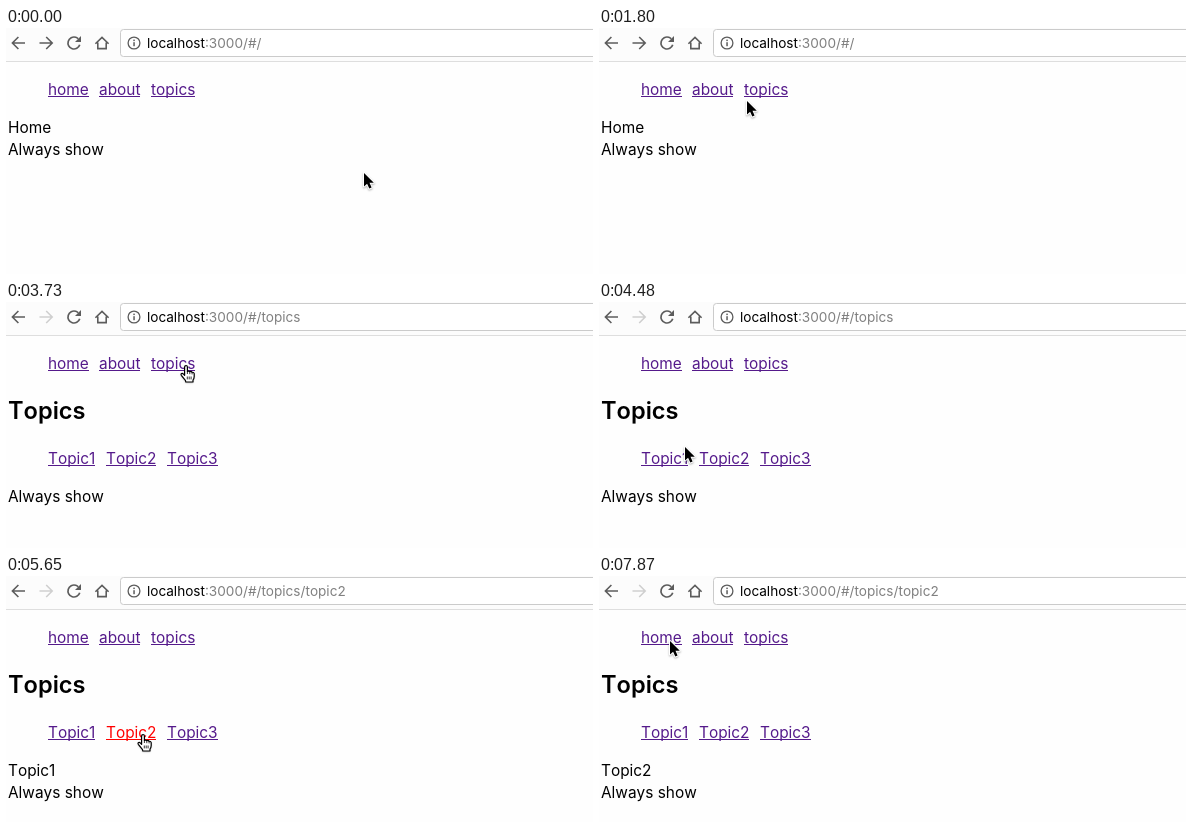
These frames come from a looping animation (587 by 246 pixels, 8 s). An HTML page with a canvas:

```html
<!DOCTYPE html>
<html lang="en">
<head>
<meta charset="utf-8">
<title>Router demo</title>
<style>
  html, body { margin: 0; width: 100%; height: 100%; overflow: hidden; background: #fefefe; }
  canvas { display: block; }
</style>
</head>
<body>
<canvas id="stage" width="587" height="246"></canvas>
<script>
const ctx = document.getElementById('stage').getContext('2d');
const LOOP = 8000, STEP = 147.5;
const PAGE = '#fefefe', ICON = '#5c5c5c', VISITED = '#551a8b';
const FAMILY = 'Inter, "Noto Sans", sans-serif';
const BODY = '15.4px ' + FAMILY;
const TITLE = '600 23.6px ' + FAMILY;
const URL_FONT = '13.6px ' + FAMILY;

// The page may follow its address after a lag
const clicks = [
  { at: 0, path: '' },
  { at: 2540, path: 'about' },
  { at: 3730, path: 'topics' },
  { at: 5070, path: 'topics/topic1' },
  { at: 5650, path: 'topics/topic2', lag: 150 },
  { at: 6530, path: 'topics/topic3' },
  { at: 7570, path: 'topics/topic2' }
];

// Each glide eases to its end point in a few held steps
const home = { x: 358, y: 145 };
const glides = [
  { at: 1500, steps: 6, x: 118, y: 63 },
  { at: 3140, steps: 2, x: 180, y: 63 },
  { at: 4180, steps: 5, x: 80, y: 151 },
  { at: 5360, steps: 2, x: 137, y: 158 },
  { at: 5950, steps: 3, x: 176, y: 158 },
  { at: 6980, steps: 1, x: 168, y: 158 },
  { at: 7130, steps: 2, x: 124, y: 158 },
  { at: 7870, steps: 1, x: 71, y: 65 }
];

const nav = [['home', 42, 67], ['about', 93, 67], ['topics', 145, 67]];
const topics = [['Topic1', 42, 162], ['Topic2', 100, 162], ['Topic3', 161, 162]];

const arrowShape = new Path2D('M0 0V13.6L3.1 10.7L5.3 15.6L7.6 14.6L5.5 9.8H9.8Z');
const handShape = new Path2D(
  'M-1.4 9V2Q-1.4 .6 0 .6Q1.4 .6 1.4 2V6.4Q2.7 5.5 3.8 6.7Q5.2 6 6.1 7.3' +
  'Q7.8 7 8.2 8.6V11.5Q8.2 13.4 7 15V17H-.2Q-.2 15.6-1.6 14.2L-4.7 10.3' +
  'Q-5.4 9-4.4 8.5Q-3.4 8.1-2.5 9.2L-1.4 10.4Z');
const handLines = new Path2D('M1.4 6.4V9M3.8 6.8V9.2M6.1 7.4V9.4M1.3 11.5V14.4M3.2 11.5V14.4M5.1 11.5V14.4');
const backShape = new Path2D('M19 15H6.6M12.4 9L6.4 15L12.4 21');
const forwardShape = new Path2D('M33.5 15H46M40.2 9L46.2 15L40.2 21');
const houseShape = new Path2D('M89.4 15.8L96 9.4L102.6 15.8M91.8 14.4V20.6H100.2V14.4');
const stopShape = new Path2D('M63 10L73 20M73 10L63 20');
const reloadHead = new Path2D('M75 8V14H69Z');

const easeOut = p => 1 - (1 - p) ** 3;

function arc(x, y, r, from, to) {
  const path = new Path2D();
  path.arc(x, y, r, from, to);
  return path;
}

function fill(path, color) {
  ctx.fillStyle = color;
  ctx.fill(path);
}

function stroke(path, color, width) {
  ctx.strokeStyle = color;
  ctx.lineWidth = width;
  ctx.stroke(path);
}

function rect(x, y, w, h, color) {
  ctx.fillStyle = color;
  ctx.fillRect(x, y, w, h);
}

// Returns the right edge of the text
function text(str, x, y, font = BODY, color = '#000') {
  ctx.font = font;
  ctx.fillStyle = color;
  ctx.fillText(str, x, y);
  return x + ctx.measureText(str).width;
}

function link([label, x, y], color) {
  const end = text(label, x, y, BODY, color);
  rect(x, y + 1, Math.round(end) - x, 1, color);
}

function toolbar(t, path) {
  rect(0, 0, 587, 33, '#fcfcfc');
  rect(0, 33, 587, 1, '#dedede');
  const field = new Path2D();
  field.roundRect(114.5, 1.5, 490, 27, 3);
  fill(field, '#fff');
  stroke(field, '#cbcbcb', 1);

  stroke(backShape, ICON, 1.6);
  stroke(forwardShape, t < 2540 ? ICON : '#cfcfcf', 1.6);
  if (t >= 600 && t < 1050) {
    stroke(stopShape, ICON, 1.7);
  } else {
    stroke(arc(68, 15, 6, 0.3, 5.5), ICON, 1.7);
    fill(reloadHead, ICON);
  }
  stroke(houseShape, ICON, 1.6);

  stroke(arc(128, 15, 5.9, 0, Math.PI * 2), ICON, 1.3);
  rect(127.3, 11.6, 1.5, 1.5, ICON);
  rect(127.3, 14.2, 1.5, 4, ICON);

  const end = text('localhost', 141, 20, URL_FONT);
  text(':3000/#/' + path, end, 20, URL_FONT, '#808080');
}

function page(path, pressed) {
  nav.forEach(item => link(item, VISITED));

  let y = 105;
  if (path.startsWith('topics')) {
    text('Topics', 2, 117, TITLE);
    topics.forEach(item => link(item, item[0] === pressed ? '#f00' : VISITED));
    y = 200;
  }
  if (path !== 'topics') {
    text(viewName(path), 2, y);
    y += 22;
  }
  text('Always show', 2, y);
}

function viewName(path) {
  const name = path.split('/').pop() || 'home';
  return name[0].toUpperCase() + name.slice(1);
}

function pointerAt(t) {
  let pos = home;
  for (const { at, steps, x, y } of glides) {
    if (t < at) break;
    const p = easeOut(Math.min(1, (Math.floor((t - at) / STEP) + 1) / steps));
    pos = { x: pos.x + (x - pos.x) * p, y: pos.y + (y - pos.y) * p };
  }
  return pos;
}

function linkAt({ x, y }) {
  ctx.font = BODY;
  return [...nav, ...topics].find(([label, left, base]) =>
    x >= left && x <= left + ctx.measureText(label).width && y >= base - 15 && y <= base + 5);
}

// The hand appears one step after the pointer reaches a link
function pointer(t) {
  const pos = pointerAt(t);
  const over = linkAt(pos);
  const hand = over && over === linkAt(pointerAt(t - STEP));
  ctx.save();
  ctx.translate(Math.round(pos.x), Math.round(pos.y));
  ctx.lineJoin = 'round';
  ctx.shadowColor = 'rgba(0,0,0,.3)';
  ctx.shadowBlur = 2;
  ctx.shadowOffsetY = 1;
  if (hand) fill(handShape, '#fff');
  else stroke(arrowShape, '#fff', 2);
  ctx.shadowColor = 'transparent';
  if (hand) {
    stroke(handShape, '#000', 1.2);
    stroke(handLines, '#000', 0.8);
  } else {
    fill(arrowShape, '#000');
  }
  ctx.restore();
}

function draw(t) {
  const i = clicks.findLastIndex(c => c.at <= t);
  const { at, path, lag = 0 } = clicks[i];
  const waiting = t < at + lag;
  const shown = waiting ? clicks[i - 1].path : path;
  const reloading = t >= 900 && t < 1050;

  ctx.fontKerning = 'none';
  rect(0, 0, 587, 246, PAGE);
  toolbar(t, path);
  if (!reloading) page(shown, waiting && viewName(path));
  pointer(t);
}

const start = performance.now();
function tick() {
  draw((performance.now() - start) % LOOP);
  requestAnimationFrame(tick);
}
tick();
</script>
</body>
</html>
```
